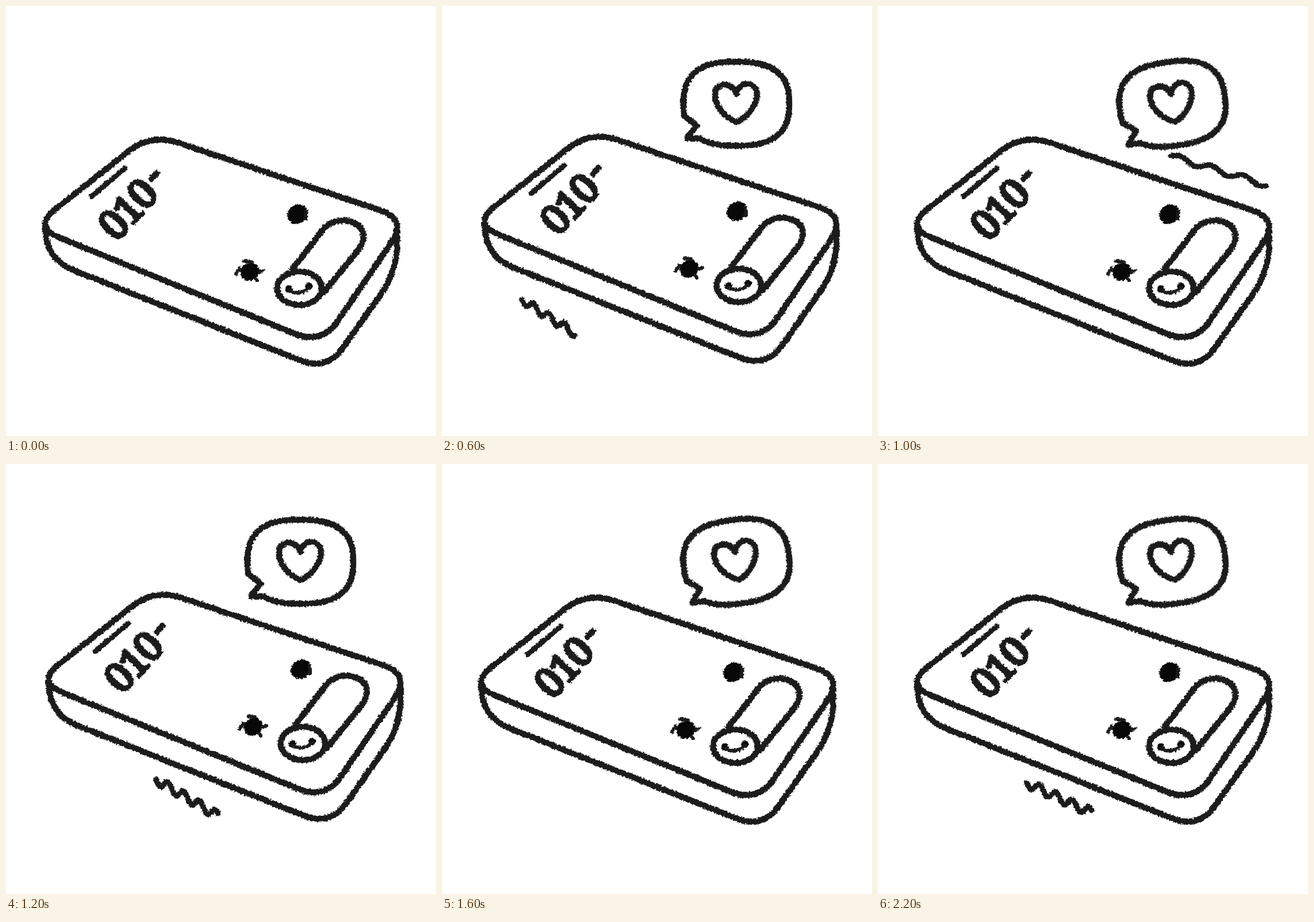
An HTML page for the animation above (2.4 s loop, 748 by 748 pixels).

```html
<!DOCTYPE html>
<html lang="en">
<head>
<meta charset="utf-8">
<title>Ringing phone</title>
<style>
  html, body { margin: 0; width: 100%; height: 100%; overflow: hidden; background: #fff; }
  svg { display: block; width: 100vw; height: 100vh; }
  #ink { fill: none; stroke: #1c1c1c; stroke-width: 10.5; stroke-linecap: round; stroke-linejoin: round; }
  #ink .solid { fill: #080808; stroke: none; }
  #ink .thin { stroke-width: 6; }
  #ink text { font: 400 70px "Noto Serif", serif; letter-spacing: -2.4px; fill: #1c1c1c; stroke-width: 5; }
</style>
</head>
<body>
<svg viewBox="0 0 748 748">
  <defs>
    <filter id="rough" filterUnits="userSpaceOnUse" x="0" y="0" width="748" height="748" color-interpolation-filters="sRGB">
      <feTurbulence type="fractalNoise" baseFrequency=".3" numOctaves="2" seed="4"/>
      <!-- Opaque noise keeps the displacement centred on zero. -->
      <feColorMatrix values="1 0 0 0 0  0 1 0 0 0  0 0 1 0 0  0 0 0 0 1"/>
      <feDisplacementMap in="SourceGraphic" scale="6" xChannelSelector="R" yChannelSelector="G"/>
      <feGaussianBlur stdDeviation=".7"/>
    </filter>
  </defs>
  <g id="ink" filter="url(#rough)">
    <g id="phone">
      <path id="face"/>
      <path id="side"/>
      <path d="M498 458L546 396Q559 374 588 373Q623 377 622 404Q619 418 609 429L553 498"/>
      <ellipse cx="510.5" cy="491" rx="39" ry="29"/>
      <path stroke-width="9" d="M149 331L207 282"/>
      <g class="solid">
        <circle cx="492" cy="492" r="6.5"/>
        <circle cx="527" cy="488" r="6.5"/>
        <ellipse rx="18.5" ry="16" transform="translate(507 362) rotate(-35)"/>
        <ellipse rx="17" ry="15" transform="translate(424 462) rotate(-30)"/>
      </g>
      <path class="thin" d="M492 494Q510 505 527 490M522 356V370M415 444L427 445M407 456L400 466M440 463L447 460M434 474L437 478"/>
      <g id="digits">
        <text transform="translate(187 380) rotate(-47)" x="-19.5" y="25">010<tspan dx="8" dy="-12">-</tspan></text>
      </g>
    </g>
    <g id="speech">
      <path id="bubble"/>
      <path id="heart" d="M512 153C504 130 474 132 475 156C476 178 494 194 512 202C532 193 548 172 548 152C546 132 519 128 512 153Z"/>
    </g>
    <path id="buzz" stroke-width="9.5"/>
  </g>
</svg>
<script>
const BEAT = 200;
const BEATS = 12;
const get = id => document.getElementById(id);
const setPath = (id, d) => get(id).setAttribute('d', d);

// Polyline whose inner corners are rounded off over a given length.
function rounded(points, closed, length = 50) {
  const n = points.length;
  const toward = ([x, y], [u, v]) => {
    const k = length / Math.hypot(u - x, v - y);
    return [x + (u - x) * k, y + (v - y) * k];
  };
  const corners = points.map((p, i) => {
    if (!closed && i % (n - 1) === 0) return `${p}`;
    return `${toward(p, points[(i + n - 1) % n])}Q${p} ${toward(p, points[(i + 1) % n])}`;
  });
  return 'M' + corners.join('L') + (closed ? 'Z' : '');
}

// Superellipse with a gap at the lower left, where the tail sticks out.
function bubblePath(cx, cy, rx, ry, power = 2.6) {
  const outline = [];
  for (let deg = 167; deg <= 497; deg += 6) {
    const c = Math.cos(deg * Math.PI / 180), s = Math.sin(deg * Math.PI / 180);
    const r = (Math.abs(c / rx) ** power + Math.abs(s / ry) ** power) ** (-1 / power);
    outline.push([cx + r * c, cy + r * s]);
  }
  return `M${outline.join('L')}L${cx - 86} ${cy + 60}L${cx - 69} ${cy + 38}Z`;
}

// Sine wave laid along the line from (x, y) to (x + dx, y + dy).
function wave(x, y, dx, dy, waves, height) {
  const points = [];
  for (let t = 0; t <= 1; t += 1 / 48) {
    points.push([x + dx * t, y + dy * t + height * Math.sin(2 * Math.PI * waves * t)]);
  }
  return 'M' + points.join('L');
}

const buzzes = {
  L: wave(44, 477, 94, 60, 3.5, 7),
  l: wave(139, 511, 94, 60, 3.5, 7),
  R: wave(544, 273, 168, 51, 3, -5),
  r: wave(510, 261, 168, 51, 3, -5),
  B: wave(261, 549, 110, 64, 4, 8),
  b: wave(259, 555, 115, 53, 4, 8)
};
// One character per beat.
const raisedBeats = '001100110010';
const buzzBeats = '--LlRrBL--Bb';
const tilts = [0, 11, -8];

function draw(beat) {
  const raised = +raisedBeats[beat];
  get('phone').setAttribute('transform', `translate(${6 * raised} ${-5 * raised})`);
  get('digits').setAttribute('transform', `translate(${4 * raised} ${-4 * raised})`);
  get('speech').setAttribute('transform', `rotate(${tilts[Math.max(beat, 3) % 3]} 512 169)`);
  get('speech').style.display = beat >= 2 ? '' : 'none';
  get('heart').style.display = beat >= 3 ? '' : 'none';
  setPath('buzz', buzzes[buzzBeats[beat]] || '');
}

setPath('face', rounded([[47, 384], [252, 222], [698, 371], [549, 589]], true));
setPath('side', rounded([[68, 382], [71, 441], [558, 635], [681, 460], [680, 390]], false));
setPath('bubble', bubblePath(512, 170, 92, 73));

let shown = -1;
function tick() {
  const beat = Math.floor(performance.now() / BEAT) % BEATS;
  if (beat !== shown) draw(shown = beat);
  requestAnimationFrame(tick);
}
tick();
</script>
</body>
</html>
```
